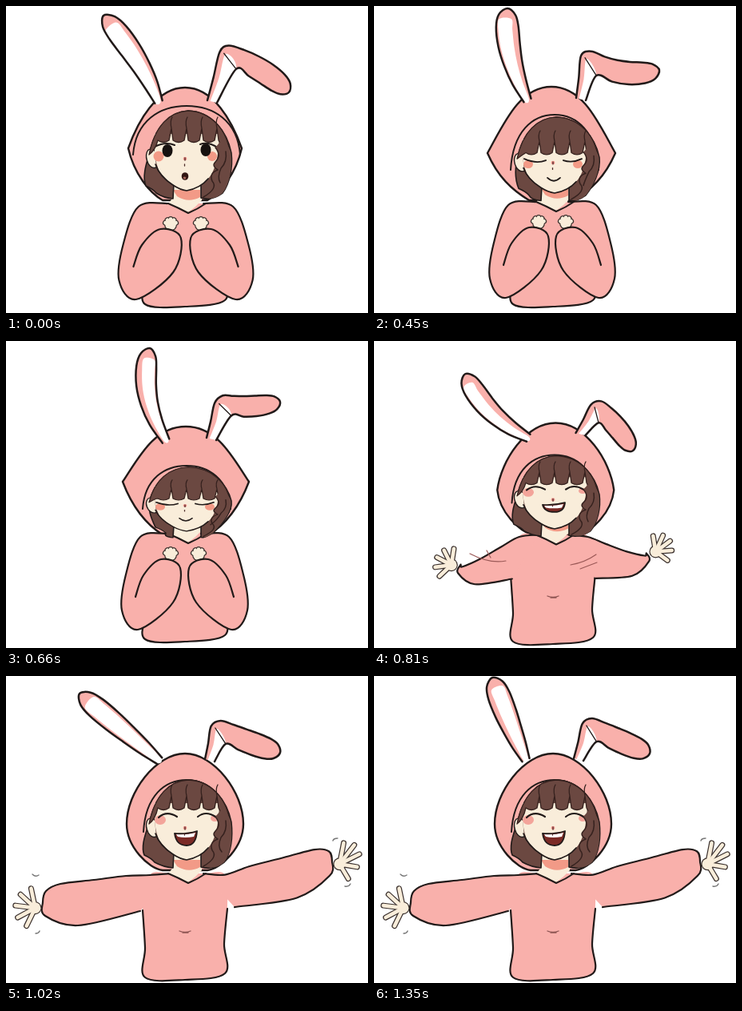
Animation, 453 px wide and 384 px high, one loop 1380 ms. Source, as an HTML page with a canvas:

```html
<!DOCTYPE html>
<html lang="en">
<head>
<meta charset="utf-8">
<title>Bunny hoodie</title>
<style>
html, body { margin: 0; width: 100%; height: 100%; overflow: hidden; background: #fff; }
canvas { display: block; width: 453px; height: 384px; }
</style>
</head>
<body>
<canvas id="stage" width="453" height="384"></canvas>
<script>
const ctx = document.getElementById('stage').getContext('2d');
const LOOP = 1380, STEP = 30;
const PINK = '#f9b0ab', SKIN = '#f9edda', HAIR = '#6b4841', INK = '#211a19', BLUSH = '#f39a86';

// ears: base, bend, tip, width     hood: centre, top, half width, corner height, roundness
// arch: top, half width, foot      head: drop, vertical scale, hair taper, bang height
// arms: spread, reach, lift, mirror axis, slope of the right arm
const shy = {
  earL: [191, 120, 170, 66, 122, 12, 17], band: [0, .78],
  earR: [258, 120, 275, 60, 322, 76, 354, 108, 15],
  hood: [224, 102, 71, 178, .35], arch: [125, 67, 186],
  head: [0, 1, 2, 168], arms: [0, 1.06, 3, 225, 0]
};
const nod = {
  earL: [192, 118, 163, 60, 167, 3, 18], band: [.1, .72],
  earR: [259, 117, 266, 66, 309, 93, 357, 80, 15],
  hood: [222, 101, 80, 184, 0], arch: [136, 55, 205],
  head: [3, .95, 8, 178], arms: [0, 1, 1, 223, 0]
};
const bow = {
  earL: [200, 125, 164, 67, 180, 9, 16], band: [.3, .92],
  earR: [257, 123, 269, 79, 304, 86, 343, 76, 13],
  hood: [225, 107, 79, 176, 0], arch: [156, 55, 210],
  head: [7, .8, 14, 180], arms: [0, 1, -3, 223.5, 0]
};
const open = {
  earL: [191, 120, 131, 104, 92, 52, 16], band: [0, .55],
  earR: [259, 115, 281, 86, 308, 112, 317, 158, 12],
  hood: [228, 101, 71, 190, 1], arch: [138, 53, 200],
  head: [3, .95, -2, 164], arms: [1, .78, -3, 225, -.28]
};
const hug = {
  earL: [192, 106, 146, 67, 92, 22, 17], band: [.12, .86],
  earR: [255, 106, 264, 66, 304, 84, 343, 96, 15],
  hood: [224, 97, 73, 185, 1], arch: [130, 54, 195],
  head: [-1, 1, 0, 166], arms: [1, 1, 1, 227, -.38]
};
const perk = {
  ...hug, band: [.25, .85],
  earL: [190, 105, 169, 60, 148, 2, 18],
  earR: [256, 105, 268, 63, 308, 82, 345, 97, 15]
};
const KEYS = [
  [0, shy], [360, shy], [450, nod], [540, nod], [660, bow],
  [720, bow], [900, open], [1020, hug], [1230, perk], [LOOP, perk]
];

// Left sleeve from the neck round the cuff to the armpit, arm folded and stretched out
const FOLDED = [[203, 244], [168, 248], [150, 295], [145, 340], [165, 364], [209, 330], [218, 287], [194, 276], [172, 296], [162, 323]];
const SPREAD = [[207, 246], [180, 248], [150, 249], [110, 254], [68, 259], [50, 268], [46, 282], [49, 299], [90, 311], [168, 293]];

const lerp = (a, b, u) => a + (b - a) * u;
const mix = (p, q, u) => p.map((v, i) => lerp(v, q[i], u));

function poseAt(t) {
  const i = KEYS.findIndex((k, n) => n > 0 && t < k[0]);
  const [t0, a] = KEYS[i - 1], [t1, b] = KEYS[i];
  const u = (t - t0) / (t1 - t0), eased = u * (2 - u);
  return Object.fromEntries(Object.keys(a).map(k => [k, mix(a[k], b[k], eased)]));
}

// Smooth curve through all points
function curve(pts, closed) {
  const n = pts.length;
  const at = i => closed ? pts[(i + n) % n] : pts[Math.max(0, Math.min(n - 1, i))];
  const path = new Path2D();
  path.moveTo(...pts[0]);
  for (let i = 0; i < (closed ? n : n - 1); i++) {
    const [a, b, c, d] = [at(i - 1), at(i), at(i + 1), at(i + 2)];
    path.bezierCurveTo(b[0] + (c[0] - a[0]) / 6, b[1] + (c[1] - a[1]) / 6,
      c[0] - (d[0] - b[0]) / 6, c[1] - (d[1] - b[1]) / 6, ...c);
  }
  return path;
}
function fill(path, color) {
  ctx.fillStyle = color;
  ctx.fill(path);
}
function ink(path, width = 2.2, color = INK) {
  ctx.strokeStyle = color;
  ctx.lineWidth = width;
  ctx.stroke(path);
}
const svg = (d, color, width) => width ? ink(new Path2D(d), width, color) : fill(new Path2D(d), color);
function oval(x, y, rx, ry, color) {
  const p = new Path2D();
  p.ellipse(x, y, rx, ry, 0, 0, 7);
  fill(p, color);
}

// Ear lobe around a bent spine: side -1 is its left edge, 1 its right edge
function lobe([x0, y0, x1, y1, x2, y2, width], root) {
  return (u, side) => {
    const a = mix([x0, y0], [x1, y1], u), b = mix([x1, y1], [x2, y2], u);
    const dx = b[0] - a[0], dy = b[1] - a[1], len = Math.hypot(dx, dy);
    const half = side * (root * (1 - u) + width * u ** .8 * Math.sqrt(1 - u ** 6));
    const [x, y] = mix(a, b, u);
    return [x - dy / len * half, y + dx / len * half];
  };
}
const ALONG = [0, .2, .4, .6, .8, .93], BACK = [...ALONG].reverse();

function leftEar(p) {
  const at = lobe(p.earL, 5), [a, b] = p.band.map(v => v * 2 - 1);
  const rim = curve([...ALONG.map(u => at(u, -1)), at(1, 0), ...BACK.map(u => at(u, 1))]);
  fill(rim, PINK);
  fill(curve([...ALONG.map(u => at(u * .95, a)), ...BACK.map(u => at(u * .95, b))], true), '#fff');
  ink(rim, 2.5);
}

function rightEar(p) {
  const [bx, by, ...spine] = p.earR, [kx, ky, cx, cy] = spine;
  const at = lobe(spine, 11), len = Math.hypot(cx - kx, cy - ky);
  const knee = [kx - (cx - kx) / len * 8, ky - (cy - ky) / len * 8];
  const left = [bx - 6, by - 2], right = [bx + 6, by + 1], crook = at(.2, 1);
  const rim = curve([left, mix(mix(left, knee, .5), [bx, by], .05), knee, ...ALONG.map(u => at(u, -1)), at(1, 0),
    ...BACK.slice(0, 5).map(u => at(u, 1)), right]);
  fill(rim, PINK);
  fill(curve([mix(left, right, .3), mix([bx, by], [kx, ky], .5), [kx, ky], crook, right]), '#fff');
  ink(curve([mix(knee, [kx, ky], .7), crook]), 1.3);
  ink(rim, 2.5);
}

function hood([cx, top, w, side, round]) {
  const path = new Path2D(), h = side - top, low = 243 - side;
  for (const s of [-1, 1]) {
    const x = k => cx + s * w * k;
    path.moveTo(cx, top);
    path.bezierCurveTo(x(.5), top, x(lerp(.74, 1, round)), side - h * .45, x(1), side);
    path.bezierCurveTo(x(lerp(.84, 1, round)), side + low * .5, x(.62), lerp(230, 241, round), cx + s * 28, 243);
    path.lineTo(cx, 243);
  }
  fill(path, PINK);
  ink(path, 2.4);
}

function arch([top, w, foot], cx) {
  const path = new Path2D(), y = lerp(foot, top, .7);
  path.moveTo(cx - w, foot);
  path.bezierCurveTo(cx - w * .95, y, cx - w * .5, top, cx, top);
  path.bezierCurveTo(cx + w * .5, top, cx + w * .95, y, cx + w, foot);
  ink(path, 2);
}

// Sleeve outline and hand direction of the left arm
function armShape([spread, reach, lift]) {
  const sleeve = FOLDED.map((q, i) => mix(q, SPREAD[i], spread))
    .map(([x, y]) => [205 + (x - 205) * reach, y + lift]);
  const aim = lerp(270, 187, spread) * Math.PI / 180;
  const polar = (c, r, a) => [c[0] + r * Math.cos(a), c[1] + r * Math.sin(a)];
  const palm = polar(mix(sleeve[6], sleeve[7], .5), 11, aim);
  const tips = [-2, -1, 0, 1, 2].map(i => polar(palm, lerp(7, 25, spread), aim + i * .62));
  return { sleeve, palm, tips };
}

function drawSleeve(pts) {
  const path = curve(pts), under = new Path2D(path);
  under.lineTo(...mix(pts[0], pts[9], .4));
  fill(under, PINK);
  ink(path);
}

function drawHand(palm, tips) {
  [[7, 8, '#3a302d'], [4.6, 6.8, SKIN]].forEach(([w, r, color]) => {
    tips.forEach(tip => ink(curve([palm, tip]), w, color));
    oval(...palm, r, r, color);
  });
}

function body(p) {
  const [spread, , , axis, slope] = p.arms;
  const { sleeve, palm, tips } = armShape(p.arms);
  const flip = ([x, y]) => {
    const fx = 2 * axis - x;
    return [fx, y + slope * Math.max(0, fx - 273)];
  };
  const [neckL, neckR] = [sleeve[0], flip(sleeve[0])];
  const hem = 373 + 4 * spread;
  const trunk = [[171, 293], [174, 340], [174, hem], [224, hem + 3], [274, hem - 5], [273, 335], [277, 291]];
  fill(curve([neckL, sleeve[1], ...trunk, flip(sleeve[1]), neckR], true), PINK);
  ink(curve(trunk));

  const hands = () => {
    drawHand(palm, tips);
    drawHand(flip(palm), tips.map(flip));
  };
  if (spread < .5) hands();
  drawSleeve(sleeve);
  drawSleeve(sleeve.map(flip));
  if (spread >= .5) hands();

  ctx.save();
  ctx.translate(0, neckL[1] - 246);
  svg('M208 222H245V242Q238 250 228 257Q215 252 203 246L208 240Z', SKIN);
  svg('M209 229H243V238Q228 246 214 237Z', '#f29a87');
  svg('M203 246Q215 251 228 258Q240 253 250 246', INK, 2);
  ctx.restore();
}

function face(mood) {
  if (mood === 'shy') {
    oval(191, 188, 6.5, 6.5, BLUSH);
    oval(258, 188, 6, 6, BLUSH);
    oval(202, 181, 6.5, 8, '#17110f');
    oval(250, 180, 6.5, 8, '#17110f');
    svg('M186 176Q200 169 211 174M243 173Q252 169 265 177', INK, 2);
    oval(224, 213, 4.3, 4.8, '#321713');
    oval(223.5, 215, 1.8, 1.5, '#a5655a');
  } else if (mood === 'calm') {
    oval(193, 193, 6, 5.5, BLUSH);
    oval(255, 193, 6, 5.5, BLUSH);
    svg('M188 186Q203 193 215 188M237 188Q248 192 260 186', INK, 2);
    svg('M217 211Q225 219 233 211', INK, 1.8);
  } else {
    const lip = mood === 'joy' ? 213 : 208, mouth = `M211 198Q226 199 239 195Q238 ${lip} 226 ${lip}Q213 ${lip} 211 198Z`;
    oval(193, 181, 7, 6, '#f3a49a');
    oval(261, 179, 5, 4, '#f3a49a');
    svg('M191 178Q201 169 214 177M240 177Q250 169 262 177', INK, 2.2);
    svg(mouth, '#7b2a25');
    svg('M213 199Q226 200 237 197L235 202Q224 204 215 202Z', '#fff');
    svg(mouth, INK, 1.8);
  }
  oval(224, 191, 2.3, 2.3, '#ee8f88');
  svg('M224 190V193M223.5 198V200', '#4a2b28', 1.3);
}

function bangs(y) {
  let edge = `M228 131C205 132 186 150 179 186Q187 180 190 ${y}`, strands = '';
  for (let x = 190; x < 260; x += 19) {
    edge += `Q${x + 7} ${y + 5} ${x + 14} ${y}L${x + 17} ${y - 15}L${x + 19} ${y}`;
    strands += `M${x + 17} ${y - 15}Q${x + 15} ${y - 24} ${x + 18} ${y - 29}`;
  }
  edge += `Q271 ${y + 10} 280 186C278 155 256 132 228 131Z`;
  svg(edge, HAIR);
  svg(edge + strands, '#35211e', 1.3);
}

function head([drop, scale, taper, fringe], mood) {
  const l = 173 + taper, r = 273 - taper;
  ctx.save();
  ctx.translate(0, 230 + drop);
  ctx.scale(1, scale);
  ctx.translate(0, -230);
  const back = `M228 131C203 133 188 152 181 178C176 196 ${l - 5} 212 ${l} 225Q${l + 9} 229 ${l + 13} 234Q197 240 209 241L210 222H244V240Q${r - 14} 244 ${r} 234C${r + 9} 222 284 202 282 184C277 158 258 132 228 131Z`;
  svg(back, HAIR);
  svg(back, INK, 1.6);
  const ear = 'M186 181C176 174 173 187 178 197Q182 204 188 202';
  svg(ear, SKIN);
  svg(ear, INK, 1.4);
  svg('M186 160Q184 190 192 207Q205 225 225 231Q243 228 253 216Q266 202 267 160', SKIN);
  svg('M187 198Q192 213 209 224Q218 230 226 231Q243 228 253 216', INK, 1.7);
  face(mood);
  bangs(fringe);
  const wave = 'M262 177Q270 187 262 195Q257 200 265 205Q254 209 258 219Q266 228 247 239';
  svg(`${wave}Q${r - 11} 244 ${r} 234C${r + 9} 222 284 202 281 182L273 164Z`, HAIR);
  svg(`${wave}M275 182Q277 195 269 203Q264 214 ${r - 3} 221`, '#35211e', 1.5);
  ctx.restore();
}

function draw(t) {
  const p = poseAt(t);
  const mood = t < 390 ? 'shy' : t < 780 ? 'calm' : t < 960 ? 'glad' : 'joy';
  ctx.fillStyle = '#fff';
  ctx.fillRect(0, 0, 453, 384);
  ctx.lineCap = ctx.lineJoin = 'round';

  hood(p.hood);
  leftEar(p);
  rightEar(p);
  body(p);
  arch(p.arch, 226);
  head(p.head, mood);

  if (t >= 780) svg('M217 319Q224 322 231 319M221 321H228', '#8d5452', 1.3);
  if (mood === 'glad') svg('M141 262L146 271M246 280Q264 277 278 267M258 285L279 277M120 266Q145 279 165 275', '#9b5957', 1.2);
  if (mood === 'joy') svg('M33 248Q37 252 41 249M37 322Q41 322 42 319M409 206Q410 203 415 203M424 263Q429 264 431 260', '#777', 1.4);
}

function frame(now) {
  draw(Math.floor((now % LOOP) / STEP) * STEP);
  requestAnimationFrame(frame);
}
draw(0);
requestAnimationFrame(frame);
</script>
</body>
</html>
```
